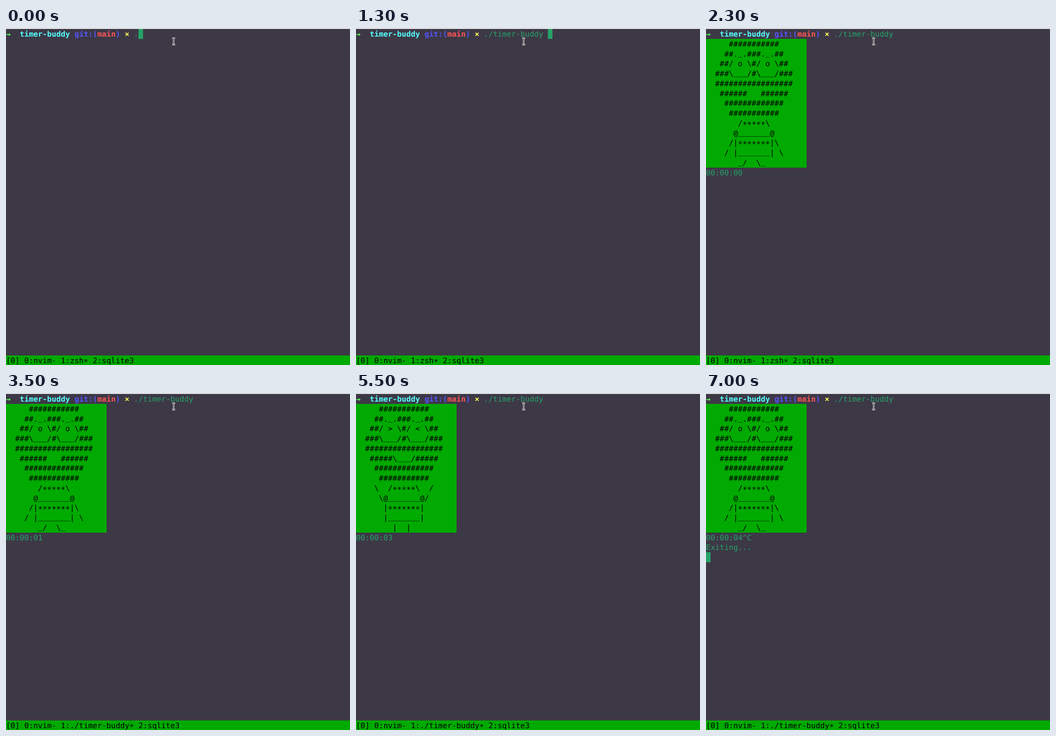
Recreate the animation shown at these times as an HTML page. Size 756 by 741 pixels, loop 8 s.

```html
<!DOCTYPE html>
<html lang="en">
<head>
<meta charset="utf-8">
<title>Terminal timer</title>
<style>
html, body { margin: 0; width: 100%; height: 100%; overflow: hidden; background: #3d3846; }
#stage {
  position: relative; width: 756px; height: 741px; overflow: hidden;
  background: #3d3846; color: #26a269;
  font: 16.68px/23px "DejaVu Sans Mono", monospace;
  text-rendering: geometricPrecision; font-variant-ligatures: none;
}
#stage > * { position: absolute; }
#edge { left: 0; top: 0; width: 756px; height: 2px; background: #eee; }
.row { left: 0; height: 23px; white-space: pre; }
.row i { position: relative; font-style: normal; }
.row .star { top: 2.5px; }
.row .rule { top: -2px; }
#art { left: 0; top: 24px; width: 221px; height: 283px; background: #0a0; }
.ink { color: #000; }
#status { left: 0; top: 720px; width: 756px; height: 21px; background: #0a0; }
#cursor { left: 0; top: 0; }
b.arrow { color: #5f5; }
b.dir { color: #5ff; }
b.git { color: #55f; }
b.branch { color: #f55; }
b.dirty { color: #ff5; }
#pointer { left: 362px; top: 20px; }
</style>
</head>
<body>
<div id="stage">
  <div id="edge"></div>
  <div id="art"></div>
  <div id="status"></div>
  <svg id="cursor" width="756" height="741">
    <rect id="block" width="10.04" height="22" fill="#26a269"/>
  </svg>
  <svg id="pointer" width="14" height="20" fill="none">
    <defs><path id="beam" d="M3 2.5H5.5L6.5 3.5L7.5 2.5H10M6.5 3V16M3 16.5H5.5L6.5 15.5L7.5 16.5H10"/></defs>
    <use href="#beam" stroke="#fff" stroke-width="3"/>
    <use href="#beam" stroke="#000"/>
  </svg>
</div>
<script>
const LOOP = 8000, CELL_W = 10.04, CELL_H = 21.75, TOP = 2, ROWS = 34;
const byId = id => document.getElementById(id);
const rowTop = row => Math.round(TOP + row * CELL_H);

const standing = String.raw`
     ###########
    ##._.###._.##
   ##/ o \#/ o \##
  ###\___/#\___/###
  #################
   ######   ######
    #############
     ###########
       /*****\
      @_______@
     /|*******|\
    / |_______| \
       _/  \_`.slice(1).split('\n');

const cheering = String.raw`
     ###########
    ##._.###._.##
   ##/ > \#/ < \##
  ###\___/#\___/###
  #################
   #####\___/#####
    #############
     ###########
    \  /*****\  /
     \@_______@/
      |*******|
      |_______|
        |  |`.slice(1).split('\n');

const prompt = '<b class="arrow">→</b>  <b class="dir">timer-buddy</b> ' +
  '<b class="git">git:(</b><b class="branch">main</b><b class="git">)</b> ' +
  '<b class="dirty">×</b> ';

// Each step changes only the listed parts; cursor is [column, row].
const steps = [
  [0, { typed: '.', cursor: [29, 0], art: [], lines: [], job: 'zsh' }],
  [800, { typed: './', cursor: [30, 0] }],
  [1100, { typed: './t', cursor: [31, 0] }],
  [1200, { typed: './ti', cursor: [32, 0] }],
  [1300, { typed: './timer-buddy', cursor: [42, 0] }],
  [2200, { cursor: [0, 1] }],
  [2300, { cursor: null, art: standing, lines: ['00:00:00'] }],
  [3500, { lines: ['00:00:01'], job: './timer-buddy' }],
  [4400, { art: cheering }],
  [4500, { lines: ['00:00:02'] }],
  [5500, { lines: ['00:00:03'] }],
  [6300, { art: standing }],
  [6500, { lines: ['00:00:04'] }],
  [7000, { lines: ['00:00:04^C', 'Exiting...'], cursor: [0, 16] }]
];

const rows = Array.from({ length: ROWS }, (_, n) => {
  const row = document.createElement('div');
  const inked = (n > 0 && n < 14) || n === ROWS - 1;
  row.className = inked ? 'row ink' : 'row';
  row.style.top = rowTop(n) + 'px';
  byId('stage').insertBefore(row, byId('cursor'));
  return row;
});

const markup = text => text
  .replace(/</g, '&lt;').replace(/>/g, '&gt;')
  .replace(/\*+/g, '<i class="star">$&</i>')
  .replace(/_+/g, '<i class="rule">$&</i>');

function draw({ typed, cursor, art, lines, job }) {
  rows.forEach((row, n) => {
    row.innerHTML = markup(art[n - 1] || lines[n - 14] || '');
  });
  rows[0].innerHTML = prompt + typed;
  rows[ROWS - 1].innerHTML = markup(`[0] 0:nvim- 1:${job}* 2:sqlite3`);
  byId('art').hidden = !art.length;
  byId('cursor').style.visibility = cursor ? 'visible' : 'hidden';
  if (cursor) {
    byId('block').setAttribute('x', cursor[0] * CELL_W);
    byId('block').setAttribute('y', rowTop(cursor[1]));
  }
}

const start = performance.now();
let shown = 0;
function tick() {
  const time = Math.max(0, performance.now() - start) % LOOP;
  const past = steps.filter(([at]) => at <= time);
  if (past.length !== shown) {
    shown = past.length;
    draw(Object.assign({}, ...past.map(([, change]) => change)));
  }
  requestAnimationFrame(tick);
}
tick();
</script>
</body>
</html>
```
